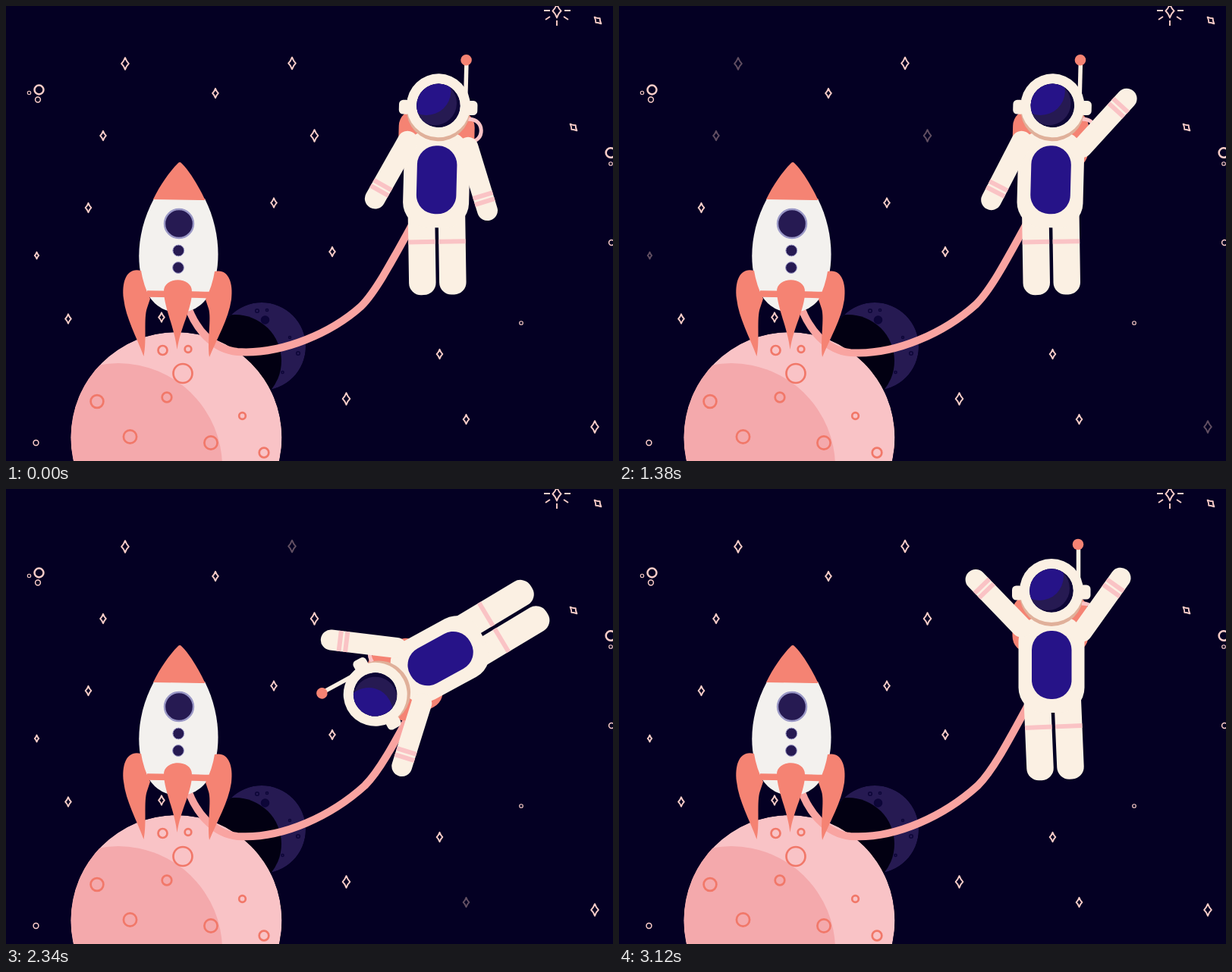
Write an HTML page that moves like this. It is 800 by 600 pixels and loops after 3150 ms.

```html
<!DOCTYPE html>
<html lang="en">
<head>
<meta charset="utf-8">
<title>Astronaut</title>
<style>
  html, body { margin: 0; width: 100%; height: 100%; overflow: hidden; background: #040023; }
  svg { display: block; width: 100%; height: 100%; }
  .ring, .star { fill: none; stroke: #fbcdc8; }
  .star { stroke-width: 1.9; stroke-linejoin: round; }
  .crater { fill: none; stroke: #f17869; }
  .salmon { fill: #f58373; }
  .suit { fill: #fbf0e3; }
  .navy { fill: #261a52; }
  .blue { fill: #261388; }
  .pink { fill: #fac3c5; }
</style>
</head>
<body>
<svg viewBox="0 0 800 600">
  <defs>
    <clipPath id="moonClip"><circle cx="337" cy="449" r="58"/></clipPath>
    <clipPath id="planetClip"><circle cx="224.5" cy="569" r="139"/></clipPath>
    <clipPath id="visorClip"><circle r="28.8"/></clipPath>
    <g id="arm">
      <path d="M0 0V87" stroke="#fbf0e3" stroke-width="27" stroke-linecap="round"/>
      <path class="pink" d="M-13.5 63.5h27v6h-27zM-13.5 72h27v6h-27z"/>
    </g>
    <g id="leg">
      <rect class="suit" y="262" width="35.5" height="121.5" rx="16"/>
      <path class="pink" d="M0 310.5h35.5v6h-35.5z"/>
    </g>
  </defs>
  <rect width="800" height="600" fill="#040023"/>
  <g id="sky"></g>

  <g clip-path="url(#moonClip)">
    <circle class="navy" cx="337" cy="449" r="58"/>
    <circle cx="302" cy="468" r="61" fill="#020012"/>
  </g>
  <g fill="none" stroke="#0d0638" stroke-width="1.5">
    <circle cx="341.5" cy="414" r="5" fill="#0d0638"/>
    <circle cx="331" cy="402" r="2.3"/>
    <circle cx="344" cy="401" r="1.6"/>
    <circle cx="374" cy="437" r="1.5"/>
    <circle cx="385" cy="458" r="2.3"/>
    <circle cx="364.5" cy="483" r="1.6"/>
  </g>

  <g clip-path="url(#planetClip)">
    <circle cx="224.5" cy="569" r="139" fill="#f9c3c6"/>
    <circle cx="148" cy="608" r="137" fill="#f4a9ac"/>
  </g>
  <g id="craters"></g>

  <path id="tether" fill="none" stroke="#f9a4a1" stroke-width="10"/>

  <g id="rocket">
    <path fill="#f3f1ee" d="M195 254C170 300 170 352 188 382Q202 404 228 404Q253 404 267 382C284 352 285 300 262 254z"/>
    <path class="salmon" d="M194 255C203 236 216 218 226 208Q229 204 232 208C243 219 254 238 262.5 256z"/>
    <path d="M186 379.5Q228 380 270 381" fill="none" stroke="#f58373" stroke-width="8.5"/>
    <g class="navy" stroke="#9a98c6">
      <circle cx="228" cy="287" r="19" stroke-width="2.4"/>
      <circle cx="227.3" cy="322.5" r="7.4" stroke-width="1"/>
      <circle cx="227" cy="345" r="7.4" stroke-width="1"/>
    </g>
    <g class="salmon">
      <path d="M178 349C160 344 152 362 155 386C158 412 172 436 181.5 462C186 440 181 412 186 398L190 386Q181 368 178 349z"/>
      <path d="M275 350C292 346 300 363 297 387C293 414 278 438 268 463C265 440 271 412 267 399L263 387Q272 369 275 350z"/>
      <path d="M208 377C207 356 246 356 245 377C245 400 230 423 225.5 453C222 423 209 400 208 377z"/>
    </g>
  </g>

  <g id="astronaut">
    <rect class="salmon" x="518" y="140" width="100" height="76" rx="22"/>
    <path d="M609 151C632 149 632 181 612 180" fill="none" stroke="#fac3c5" stroke-width="5"/>
    <g transform="rotate(-2.4 571 290)">
      <use href="#leg" x="533.5"/>
      <use href="#leg" x="573.5"/>
    </g>
    <rect class="suit" x="526" y="167" width="87" height="128" rx="33"/>
    <use id="left" href="#arm"/>
    <use id="right" href="#arm"/>
    <rect class="blue" x="543.5" y="187" width="52.5" height="90" rx="25"/>
    <path d="M605 76V128" stroke="#fbf0e3" stroke-width="5.5"/>
    <circle class="salmon" cx="604.5" cy="73" r="7.3"/>
    <circle cx="569.5" cy="139" r="42" fill="#e0b09a"/>
    <rect class="suit" x="517.5" y="127.5" width="15" height="19" rx="5.5"/>
    <rect class="suit" x="606" y="126.5" width="15" height="19" rx="5.5"/>
    <circle class="suit" cx="569.5" cy="134" r="42"/>
    <g transform="translate(569.5 134)" clip-path="url(#visorClip)">
      <circle r="29" fill="#0d0636"/>
      <circle class="navy" cx="-5" cy="-3" r="29"/>
      <circle class="blue" cx="-16" cy="-19" r="32"/>
    </g>
  </g>
</svg>
<script>
const LOOP = 3150, FRAME = 30, TUMBLE = 1890;
const $ = id => document.getElementById(id);

function add(parent, tag, attrs) {
  const el = document.createElementNS('http://www.w3.org/2000/svg', tag);
  for (const k in attrs) el.setAttribute(k, attrs[k]);
  return $(parent).appendChild(el);
}
function circles(parent, cls, width, spots) {
  for (const [cx, cy, r] of spots)
    add(parent, 'circle', { class: cls, cx, cy, r, 'stroke-width': width(r) });
}
function star(x, y, h, tilt = 0, extra = '') {
  const w = h * .62, a = w * .4, b = h * .32;
  return add('sky', 'path', {
    class: 'star',
    transform: `translate(${x} ${y}) rotate(${tilt})`,
    d: `M0 ${-h}Q${a} ${-b} ${w} 0Q${a} ${b} 0 ${h}Q${-a} ${b} ${-w} 0Q${-a} ${-b} 0 ${-h}z${extra}`
  });
}

circles('craters', 'crater', () => 2.7, [
  [206.5, 454, 6], [240, 452.5, 4.3], [233, 484.5, 12.5], [120, 521.5, 8.4],
  [212, 516, 6.3], [311.5, 540.5, 4.3], [163.5, 568, 8.6], [270, 576, 8.6], [340, 589, 6.3]
]);
circles('sky', 'ring', r => .3 + .36 * r, [
  [43.5, 110.5, 6], [30.5, 114.5, 2.2], [42, 123.5, 3.4], [39.5, 576, 3.4],
  [679, 418, 2.3], [797, 193.5, 6.3], [797, 208, 2.3], [798, 312, 3.4]
]);

const BIG = 7.8, MID = 6.2, SMALL = 4.4;
for (const [x, y] of [[276, 115], [108.5, 266], [353, 259.5], [430, 324], [82, 412.5], [205, 410.5], [571.5, 459]])
  star(x, y, MID);
star(448.5, 518, BIG);

// Each group dims in turn, one wave after the other
const waves = [
  [star(726, 6.5, 9, 0, 'M-17-.5h8M10-.5h8M-15 11.5l6-4M15 11.5l-6-4M0 12.5v7')],
  [star(780, 19, MID, -45), star(748, 160, MID, -45)],
  [star(157, 76, BIG), star(128, 171, MID), star(406.5, 171, BIG), star(40.5, 329, SMALL), star(776, 555, BIG)],
  [],
  [star(377, 75.5, BIG), star(606.5, 545, MID)]
];

const clamp = v => Math.min(1, Math.max(0, v));
const progress = (t, from, to) => clamp((t - from) / (to - from));
const ease = (t, from, to) => {
  const u = progress(t, from, to);
  return u * u * (3 - 2 * u);
};
const hump = u => Math.sin(Math.PI * u) ** 2;

function draw(t) {
  const turn = ease(t, TUMBLE, TUMBLE + 1165);
  const lift = ease(t, TUMBLE, TUMBLE + 420);
  const wave = ease(t, 0, 480) - ease(t, 1320, 1800);
  const sway = 5 * hump(t < TUMBLE ? t / TUMBLE : (t - TUMBLE) / 820);

  const left = 28 - 3 * progress(t, 0, TUMBLE) + 111 * lift;
  const right = -18.5 - 126 * (wave + lift) + 17 * hump(progress(t, 480, 1320));
  const set = (id, value) => $(id).setAttribute('transform', value);
  set('astronaut', `translate(${sway / 2 - 2} ${-2.7 * (1 - turn)}) rotate(${1.5 - 361.5 * turn} 569 228)`);
  set('left', `translate(530 182) rotate(${left})`);
  set('right', `translate(610 188) rotate(${right})`);

  const low = 456 + sway * .4;
  $('tether').setAttribute('d',
    `M238 392C250 428 274 ${low - 3} 305 ${low}C365 ${low + 4} 430 430 ${468 + sway} ${396 - sway}` +
    `C${490 + sway} ${374 - sway} ${513 + sway / 2} 328 ${552 + sway / 3} 258`);

  waves.forEach((group, i) => {
    const from = 60 + 500 * i, u = progress(t, from, from + 620);
    for (const el of group) el.setAttribute('opacity', 1 - .62 * Math.sin(Math.PI * u));
  });
}

const start = performance.now();
function tick() {
  const t = (performance.now() - start) % LOOP;
  draw(Math.floor(t / FRAME) * FRAME);
  requestAnimationFrame(tick);
}
tick();
</script>
</body>
</html>
```
